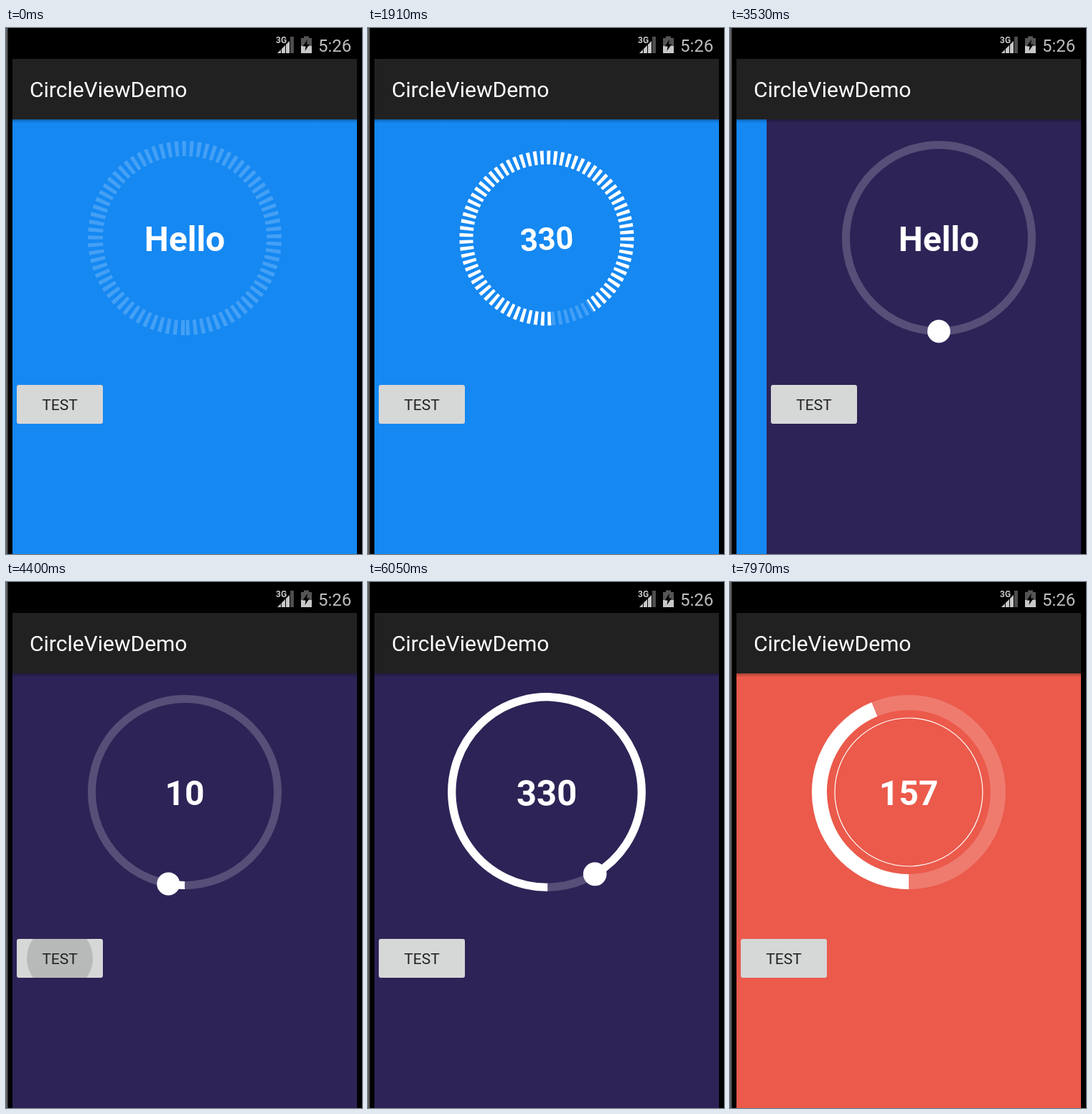
Animation, 496 px wide and 731 px high, one loop 8 s. Source, as an HTML page:

```html
<!DOCTYPE html>
<html lang="en">
<head>
<meta charset="utf-8">
<title>Circle view demo</title>
<style>
  html, body { margin: 0; width: 100%; height: 100%; overflow: hidden; background: #000; }
  svg { display: block; width: 496px; height: 731px; font-family: Roboto, sans-serif; }
  .value { font-size: 48px; font-weight: 700; text-anchor: middle; fill: #fff; }
  .label { font-size: 21px; text-anchor: middle; fill: #222; }
  .track, .fill { fill: none; stroke: #fff; }
  .track { stroke-opacity: .2; }
</style>
</head>
<body>
<svg id="stage" viewBox="0 0 496 731">
  <defs>
    <clipPath id="content"><rect x="9" y="127" width="480" height="604"/></clipPath>
    <clipPath id="button"><rect x="15" y="496" width="120" height="54" rx="3"/></clipPath>
    <linearGradient id="shade" x2="0" y2="1">
      <stop stop-opacity=".28"/><stop offset="1" stop-opacity="0"/>
    </linearGradient>
  </defs>
  <rect width="496" height="731"/>
  <rect width="2.5" height="731" fill="#5c5c5c"/>

  <g id="pages" clip-path="url(#content)"></g>

  <rect x="9" y="43" width="480" height="84" fill="#212121"/>
  <rect x="9" y="127" width="480" height="5" fill="url(#shade)"/>
  <text x="33" y="96" font-size="30" fill="#fff">CircleViewDemo</text>

  <g fill="#c8c8c8">
    <text x="376" y="21" font-size="12" font-weight="700">3G</text>
    <path d="M378 35L383 30V35ZM384 35V29L389 24V35ZM390 35V23L395 18V35Z"/>
    <path d="M396 35V12H401V35Z" fill="#4d4d4d"/>
    <path d="M411 14H415V11.5H422V14H426V35H411Z" fill="#555"/>
    <rect x="411" y="25" width="15" height="10"/>
    <path d="M420 16L413.500 25.500H417.500L416.500 32L423 22.500H419Z" fill="#000"/>
    <text x="435" y="33" font-size="24" fill="#bdbdbd">5:26</text>
  </g>
</svg>
<script>
const LOOP = 8000, GOAL = 330, STEP = 30;
const start = performance.now();

const pages = [
  { color: '#1588f2', radius: 124.5, width: 21, dash: '5.1 5.1',
    press: 500, begin: 540, count: 1060, shake: 1060 },
  { color: '#2d2356', radius: 129.5, width: 11, dash: 'none', dot: true,
    press: 4280, begin: 4310, count: 803, shake: 1027, enter: [3080, 750, .386] },
  { color: '#eb5a4b', radius: 124.5, width: 21, dash: 'none', rim: true,
    press: 7430, begin: 7470, count: 1030, shake: 1000, enter: [6500, 480, .432] }
];

const clamp = x => Math.min(1, Math.max(0, x));
const ease = x => (1 - Math.cos(Math.PI * x)) / 2;

function along(keys, p) {
  const at = p * (keys.length - 1);
  const i = Math.min(Math.floor(at), keys.length - 2);
  return keys[i] + (keys[i + 1] - keys[i]) * (at - i);
}

const SCALES = [1, .9, .9, 1.125, 1.125, 1.125, 1.125, 1.125, 1.125, 1];
const TILTS = [0, -3, -3, 3, -3, 3, -3, 3, -3, 0];

function build(page) {
  const { color, radius, width, dash, dot, rim } = page;
  const g = document.createElementNS('http://www.w3.org/2000/svg', 'g');
  const stroke = `stroke-width="${width}" stroke-dasharray="${dash}"`;
  g.innerHTML = `
    <rect x="9" y="127" width="480" height="604" fill="${color}"/>
    <g class="dial">
      <circle class="track" r="${radius}" ${stroke} transform="rotate(90)"/>
      <path class="fill" ${stroke}/>
      ${rim ? '<circle r="103" fill="none" stroke="#fff" stroke-width="1.2"/>' : ''}
      ${dot ? '<circle class="dot" r="16" fill="#fff"/>' : ''}
      <text class="value" y="18">Hello</text>
    </g>
    <g clip-path="url(#button)">
      <rect x="15" y="496" width="120" height="54" fill="#d6d7d7"/>
      <circle class="ripple" cx="75" cy="523"/>
    </g>
    <text class="label" x="75" y="531">TEST</text>`;
  document.getElementById('pages').append(g);
  page.group = g;
  for (const name of ['dial', 'fill', 'dot', 'value', 'ripple'])
    page[name + 'Node'] = g.querySelector('.' + name);
}

// A finger drag that speeds up, then a quintic settle.
function slide(t, [from, duration, release]) {
  const u = clamp((t - from) / duration);
  if (u < release) return .255 * (u / release) ** 2;
  return 1 - .745 * ((1 - u) / (1 - release)) ** 5;
}

function drawDial(page, t) {
  const degrees = GOAL * ease(clamp((t - page.begin) / page.count));
  const angle = degrees * Math.PI / 180, r = page.radius;
  const x = -r * Math.sin(angle), y = r * Math.cos(angle);
  page.fillNode.setAttribute('d', degrees > .1
    ? `M0 ${r}A${r} ${r} 0 ${degrees > 180 ? 1 : 0} 1 ${x} ${y}` : '');
  page.valueNode.textContent = t < page.begin ? 'Hello' : Math.floor(degrees + 1e-6);
  if (page.dotNode) {
    page.dotNode.setAttribute('cx', x);
    page.dotNode.setAttribute('cy', y);
  }
  const p = ease(clamp((t - page.begin - page.count) / page.shake));
  page.dialNode.setAttribute('transform',
    `translate(249 292) rotate(${along(TILTS, p)}) scale(${along(SCALES, p)})`);
}

function drawRipple(page, t) {
  const age = t - page.press + STEP;
  page.rippleNode.setAttribute('r', 10 + 60 * clamp(age / 250));
  page.rippleNode.setAttribute('opacity', age > 0 ? .14 * clamp((400 - age) / 250) : 0);
}

function draw(time) {
  const t = Math.floor((time - 20) / STEP) * STEP + 20;
  const entered = pages.map(p => p.enter ? slide(t, p.enter) : 1);
  pages.forEach((page, i) => {
    const leaving = entered[i + 1] || 0;
    const offset = 480 * (1 - entered[i] - leaving);
    page.group.setAttribute('transform', `translate(${Math.round(offset)} 0)`);
    drawDial(page, t);
    drawRipple(page, t);
  });
}

function tick() {
  draw((performance.now() - start) % LOOP);
  requestAnimationFrame(tick);
}

pages.forEach(build);
tick();
</script>
</body>
</html>
```
